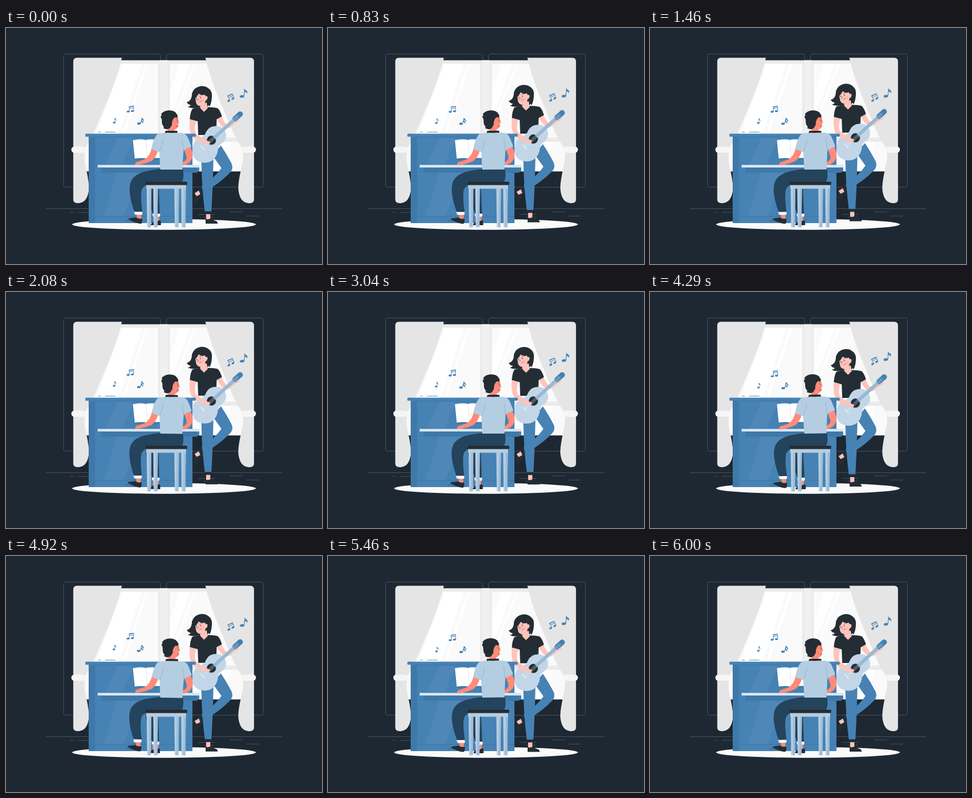
Recreate the animation shown at these times as an HTML page. Size 600 px wide and 450 px high, loop 6040 ms.

```html
<!DOCTYPE html>
<html lang="en">
<head>
<meta charset="utf-8">
<title>Piano and guitar duet</title>
<style>
html, body { margin: 0; height: 100%; overflow: hidden; background: #1d2833; }
svg { display: block; width: 600px; height: 450px; }
.blue { fill: #4682b4; }
.pale { fill: #b5cde1; }
.dark { fill: #232d33; }
.navy { fill: #24435c; }
.coral { fill: #ff8b7b; }
.pink { fill: #ffc3bb; }
.white { fill: #fff; }
.shade { fill: #3f79a9; }
.shine { fill: #4f87b9; }
.line { fill: none; stroke: #56606a; stroke-width: .8; }
.ink { fill: none; stroke: #4682b4; stroke-width: 1; }
.beam { fill: none; stroke: #4682b4; stroke-width: 1.8; }
</style>
</head>
<body>
<svg viewBox="0 0 600 450">
  <defs>
    <g id="curtain">
      <path fill="#e5e5e5" d="M135 56.700H220C212 96 189 148 166 202Q156 222 147 233C147 256 157.500 282 157.500 306C156 325 149 334 136 334Q127.700 334 127.700 327V64Q127.700 56.700 135 56.700Z"/>
      <rect x="124" y="226" width="27" height="12" rx="6" fill="#f5f5f5"/>
    </g>
    <g id="leg">
      <path class="pale" d="M0 300h9l-1 80H1z"/>
      <path fill="#9fbdd7" d="M5 306h4l-1 74H4z"/>
    </g>
  </defs>

  <!-- room -->
  <g class="line">
    <rect x="109.5" y="49.5" width="184" height="254" rx="4"/>
    <rect x="304.5" y="49.5" width="184" height="254" rx="4"/>
    <path d="M75 344.5H525M122 351.5h6M136 351.5h21M425 350.5h25M456 358.5h24M365 355.5h31M376 361h18"/>
  </g>
  <rect x="146" y="61.5" width="308" height="212" fill="#ebebeb"/>
  <path fill="#fafafa" d="M150 68H289V273H150ZM311 68H450V209H311ZM311 217H450V273H311Z"/>
  <rect x="293" y="61.500" width="14" height="212" fill="#f0f0f0"/>
  <path class="white" d="M221 68H258L214 202H172ZM265 68h5L226 202h-5ZM330 68H350L311 172V122ZM357 68h4L311 196V186ZM398 217H428L410 273H380Z"/>
  <use href="#curtain"/>
  <use href="#curtain" transform="matrix(-1 0 0 1 598.6 0)"/>
  <ellipse cx="300" cy="374.5" rx="174.5" ry="10.2" fill="#fafafa"/>

  <g id="woman">
    <path class="blue" d="M392 243L408 224Q420 242 428.500 259Q432 268 426 275Q410 292 390 304.500L372 308V301Q398 284 409 267Z"/>
    <path class="dark" d="M365 308L372 303L374 317L369 322Z"/>
    <path class="pink" d="M358 315L366 310L369 317L362 321Z"/>
    <path class="dark" d="M357 320Q363 322 369 317Q370 325 365 330L361 336Q355 333 357 320Z"/>
    <path class="pink" d="M380 354H388V366H380Z"/>
    <path class="dark" d="M379 364Q384 366 389 363Q394 367 400 368.500Q402 370 402 373H379Z"/>
    <path class="blue" d="M371 248L394 240Q393 300 390 350H377.500Q371 300 371 248Z"/>
    <path class="dark" d="M377.500 349.500H390V355H378Z"/>
    <path class="pink" d="M400 172L409 168Q413 179 421 186L436 173L442 176L426 189Q419 194 413 190Q405 184 400 172Z"/>
    <path class="dark" d="M354 154Q362 152 369 151H384Q396 151 402 153Q407 158 410 168.500L400 174L399 204H365L364 178L349 174Q350 160 354 154Z"/>
    <path class="dark" d="M353 125Q357 113 369 111Q377 110 383 114Q391 119 391 128Q391 141 386.500 150L385 147L382 150Q379 147 379 143L368 151Q356 155 345 150.500Q349 150 351 147Q346 146 343 141.500Q353 139 353 125Z"/>
    <path class="pink" d="M369 146L381 142L383 153L376 160L369 153Z"/>
    <path class="pink" d="M359.500 134Q363 130 366 125Q371 130 377.500 127L379 130Q383.500 129 382.500 134Q381.500 138 379 138Q378 147 371 149Q363 149 361 143Z"/>
    <g fill="#ffab9f"><circle cx="364" cy="139" r="1.500"/><circle cx="374.500" cy="137" r="1.500"/></g>
    <g class="dark"><circle cx="362" cy="135" r=".9"/><circle cx="369" cy="133" r=".9"/></g>
    <path d="M360 132.500l2.500-1.500M367 130l3.500-.7M367.500 140.500Q370 141 372 138M365 135l-.5 3" fill="none" stroke="#232d33" stroke-width=".6"/>
    <path fill="#c2d6e7" d="M398 187Q414 186 418 203Q419 215 408 221Q402 225 402 235Q397 257 376 257Q355 255 354 236Q353 217 366 211Q378 206 380 198Q386 187 398 187Z"/>
    <g transform="translate(390 214) rotate(-42.400)">
      <circle r="9.600" fill="#a8c4dc"/>
      <circle r="8.600" class="dark"/>
      <rect x="-24" y="-6" width="2.500" height="12" fill="#dce8f2"/>
      <rect x="7" y="-3.200" width="54" height="6.400" fill="#82a9cb"/>
      <rect x="56" y="-5" width="23" height="10" rx="4.500" class="blue"/>
      <path d="M-23-2.400H68M-23-.8H70M-23 .8H70M-23 2.400H68" stroke="#dce8f2" stroke-width=".5"/>
      <path d="M63-5.500v11M68-5.500v11M73-5.500v11" stroke="#36658d" stroke-width=".6"/>
    </g>
    <path class="pink" d="M349 174L361 177.500Q357 191 360 201Q369 208 380 214L388 217.500L385 222Q379 224 372 219Q356 211 351.500 203Q347 190 349 174Z"/>
    <path class="pink" d="M437 177Q439 174 443 175Q443 178 439 180Z"/>
  </g>

  <!-- piano -->
  <rect class="blue" x="157" y="207" width="197" height="165"/>
  <path class="shine" d="M211 209H243L221 261H189ZM210 276H259L222 359H186Z"/>
  <path class="shade" d="M157 207H354V209H169V372H157ZM169 358.500H354V360H169Z"/>
  <rect class="blue" x="150.700" y="201.600" width="209.600" height="5.600" rx="1.500"/>
  <path class="blue" d="M169 264H367V273.500H169Z"/>
  <path class="shade" d="M181 266H363V276H181Z"/>
  <path fill="#d7e5f1" d="M174 261H367V266H174Z"/>
  <path class="ink" d="M175 198.500h5M188 198.500h20"/>
  <path class="shade" d="M227 366Q235 363 246 365V370H227ZM244 249H294V251H244Z"/>
  <path class="white" d="M241 214Q255 211 265 213.500Q276 211 290 214L294 248Q281 247 269 249Q257 247 244.500 249Z"/>
  <path d="M265.500 214L269 249" stroke="#d5dce2" stroke-width=".8"/>

  <g id="man">
    <path class="coral" d="M280 357H291V370H280Z"/>
    <path class="navy" d="M264 294H290L292 355H279Q271 333 266 306Z"/>
    <path class="white" d="M278 354H292.500V359.500H279Z"/>
    <path class="dark" d="M275 375Q277 370 283 369Q289 369 292 366Q295 369 294 376H275Z"/>
    <path class="coral" d="M248 354L257 353V366H249Z"/>
    <path class="navy" d="M293 269H336Q339 288 333 295L278 297Q261 298 257.500 309Q255 324 259 351H244Q233 320 235 303C236 286 248 276 272 272Q283 269 293 269Z"/>
    <path class="white" d="M243 350.500H259L258.500 356H245Z"/>
    <path class="dark" d="M233 363Q241 362 247 361Q252 365 258 363Q260 368 257 373Q249 374 233 365Z"/>
    <path class="coral" d="M336 229L349 224Q356 239 354 247Q350 259 338 261.500L333 261V257Q341 254 343 248Q342 240 336 229Z"/>
    <path class="coral" d="M277 228L289 233Q284 249 275.500 254Q265 259 252 261Q245 262 245 259Q246 255 253 254L263 250.500Q273 245 277 228Z"/>
    <path class="coral" d="M307 184L315 169L325 167Q327 171 327 175L329 180L327 182Q328 191 321 193L319 198H307Z"/>
    <path class="dark" d="M303 196H325L326 201H301Z"/>
    <path class="pale" d="M288 202Q300 199 313 200Q330 199 338 201Q343 204 345 208L352 226L337 233L335 270H293L291 236L276 231Q280 209 288 202Z"/>
    <path d="M291 236Q297 224 298 212M334 211L337 233" fill="none" stroke="#94b4cf"/>
    <path class="dark" d="M293.500 169L296 165.500L294 164.500Q299 157.500 309 157Q321 157 324 164Q327 167 325 171Q318 169 318 174L315 179Q316 184 313 188Q311 193 304.500 193L298.500 191L300 188.500Q295 184 296 175Z"/>
    <circle class="coral" cx="319.500" cy="176.500" r="3.200"/>
    <path d="M323 174l3-1M323 188l4-1" stroke="#232d33" stroke-width=".6"/>
    <circle class="dark" cx="325" cy="177" r=".8"/>
  </g>

  <!-- stool -->
  <use href="#leg" x="267"/>
  <use href="#leg" x="279.500"/>
  <use href="#leg" x="319.500"/>
  <use href="#leg" x="332.500"/>
  <rect class="pale" x="266" y="299" width="76" height="7.500"/>
  <rect class="dark" x="265" y="293" width="79" height="6.500" rx="2"/>

  <g id="notes" class="blue">
    <ellipse cx="205.500" cy="180.500" rx="2.500" ry="1.700"/>
    <path d="M207 180.500L206 171Q210 174 209.500 178Q208.500 175 207 174.500L207.800 180.500Z"/>
    <ellipse cx="232" cy="159.300" rx="2.900" ry="1.800"/>
    <ellipse cx="240" cy="158.300" rx="2.900" ry="1.800"/>
    <path class="ink" d="M234.500 159L234 149.500M242.500 158L242 148.500M234.200 153.200L242.200 151.900"/>
    <path class="beam" d="M233.600 150.200L242.500 148.900"/>
    <ellipse cx="252.500" cy="182.200" rx="3.500" ry="2.100"/>
    <path class="ink" d="M255.500 182L258.200 171"/>
    <path d="M258 170Q259 173 261 174Q263 176 262 178.500Q260.500 175.500 257.500 174.500ZM257 174.500Q258 177 260 178Q261.500 180 260.500 182Q259 179.500 256.500 178.500Z"/>
    <ellipse cx="423" cy="138.700" rx="2.900" ry="1.900" transform="rotate(-25 423 138.700)"/>
    <ellipse cx="430.700" cy="134.500" rx="2.900" ry="1.900" transform="rotate(-25 430.700 134.500)"/>
    <path class="ink" d="M425.300 137.700L420.700 129.500M433 133.500L429.600 125.300M422.300 132.700L431 128.700"/>
    <path class="beam" d="M420.500 129.900L430 125.600"/>
    <ellipse cx="448" cy="130.500" rx="4.300" ry="2.500" transform="rotate(-8 448 130.500)"/>
    <path d="M451.300 130L452.500 115Q453.500 118 456.500 119Q459 121 457.500 125Q456 122 453.300 121.500L452.400 130.500Z"/>
  </g>
</svg>
<script>
const LOOP = 6040;
const [woman, man, notes] = ["woman", "man", "notes"].map(id => document.getElementById(id));

function draw(now) {
  const turn = 2 * Math.PI * (now % LOOP) / LOOP;
  // one slow float and four one-degree sways per loop
  const lift = 3.5 * Math.cos(turn + 0.52) - 3.04;
  const sway = Math.sin(4 * turn);
  woman.setAttribute("transform", `translate(0 ${lift})`);
  man.setAttribute("transform", `rotate(${sway} 294 267)`);
  notes.setAttribute("transform", `rotate(${sway} 331 150)`);
}

const start = performance.now();
function tick() {
  draw(performance.now() - start);
  requestAnimationFrame(tick);
}
tick();
</script>
</body>
</html>
```
